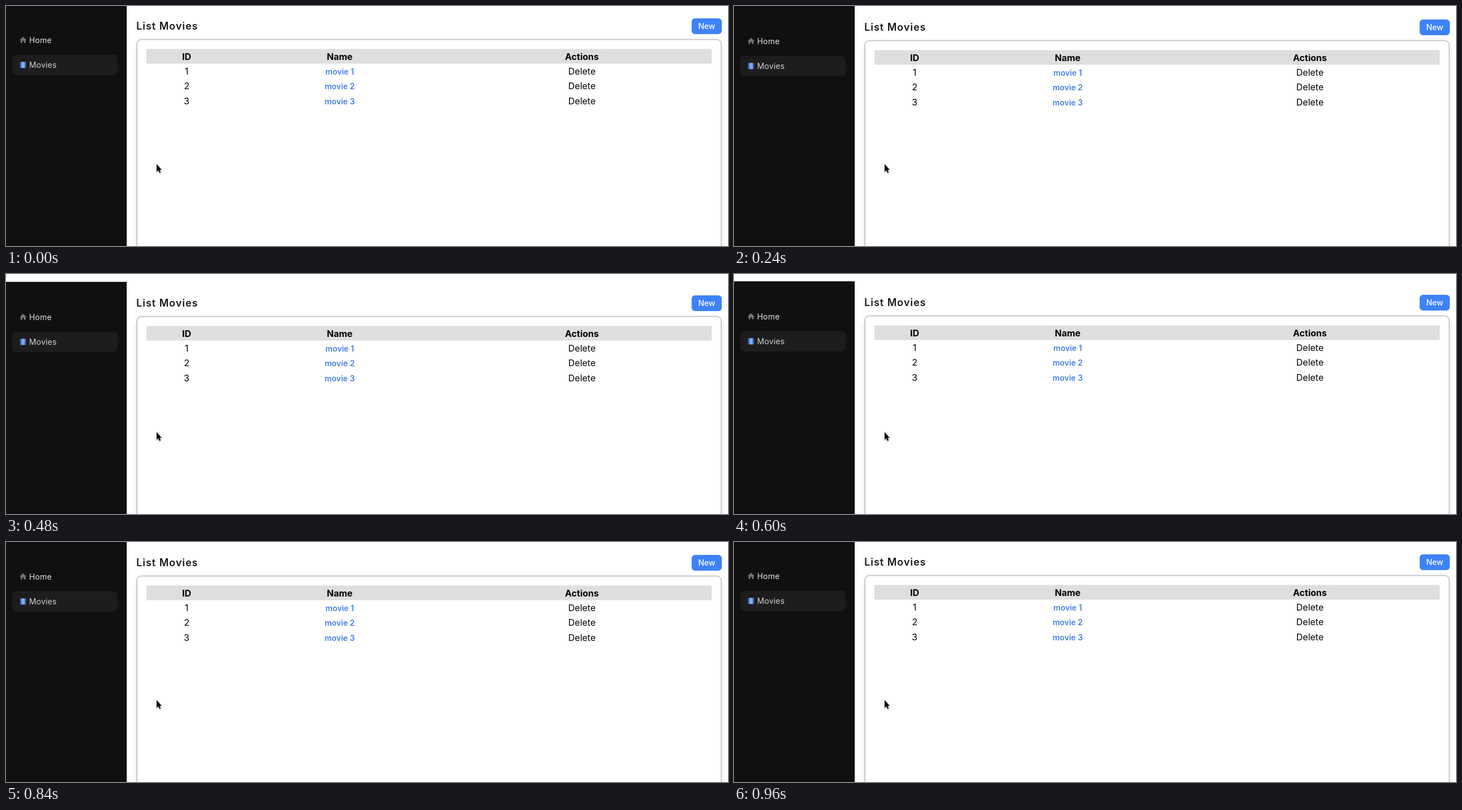
These frames come from a looping animation (1280 by 427 pixels, 1.08 s). An HTML page:

```html
<!DOCTYPE html>
<html lang="en">
<head>
<meta charset="utf-8">
<title>List Movies</title>
<style>
  html, body { margin: 0; width: 100%; height: 100%; overflow: hidden; background: #fff; }
  svg { display: block; width: 100%; height: 100%; }
  text { font-family: Inter, sans-serif; white-space: pre; }
</style>
</head>
<body>
<svg viewBox="0 0 1280 427">
  <defs>
    <filter id="soft" x="-10%" y="-10%" width="120%" height="120%">
      <feGaussianBlur stdDeviation="6"/>
    </filter>
    <filter id="drop" x="-50%" y="-50%" width="200%" height="200%">
      <feDropShadow dx="0" dy="1" stdDeviation="0.9" flood-opacity="0.4"/>
    </filter>
  </defs>
  <rect width="1280" height="427" fill="#fff"/>
  <g id="page">
    <rect x="232" y="69" width="1036" height="500" rx="8" fill="#000" opacity="0.13" filter="url(#soft)"/>
    <rect y="-2" width="214" height="480" fill="#101010"/>
    <rect x="11" y="86.5" width="187" height="36.5" rx="8" fill="#1d1d1d"/>
    <path d="M30.3 54.8L36.4 60.6H34.8V65.6H31.7V62.1H28.9V65.6H25.8V60.6H24.2Z" fill="#747474"/>
    <rect x="25" y="99.4" width="10.4" height="10.8" rx="0.6" fill="#4a80d2"/>
    <rect x="27.6" y="99.4" width="5.2" height="10.8" fill="#7eaaf5"/>
    <path d="M26.2 100.4V110M34.2 100.4V110" stroke="#172a48" stroke-width="1" stroke-dasharray="1 1.3"/>
    <rect x="232" y="59.5" width="1036" height="500" rx="8" fill="#fff" stroke="#c9c9c9" stroke-width="2"/>
    <rect x="249" y="76.5" width="1002" height="26" fill="#dedede"/>
    <rect x="1215.5" y="22" width="53.5" height="28" rx="6" fill="#3e82f7"/>
    <g id="labels"></g>
  </g>
  <path d="M267 281.3V295L270 292.2L272.2 297L274.3 296.1L272.2 291.5H276Z"
        fill="#000" stroke="#fff" stroke-width="1" paint-order="stroke" filter="url(#drop)"/>
</svg>
<script>
const STEP = 120;
const offsets = [0, 1, 2, 6, 16, 15, 3, 1, 0]; // overscroll bounce, px
const page = document.getElementById("page");
const labels = document.getElementById("labels");

function label(text, x, y, size, weight, fill, anchor = "middle", spacing = 0) {
  const el = document.createElementNS("http://www.w3.org/2000/svg", "text");
  const attrs = { x, y, fill, "font-size": size, "font-weight": weight,
    "text-anchor": anchor, "letter-spacing": spacing };
  for (const key in attrs) el.setAttribute(key, attrs[key]);
  el.textContent = text;
  labels.append(el);
}

label("Home", 41, 65.6, 14, 400, "#e2e2e2", "start", 0.2);
label("Movies", 41, 109.8, 14, 400, "#d2d2d2", "start", 0.2);
label("List Movies", 231, 42.2, 18, 600, "#181818", "start", 1);
label("New", 1242.3, 41.3, 14, 500, "#fff");
label("ID", 320.3, 95.8, 16, 700, "#000");
label("Name", 591.5, 95.8, 16, 700, "#000");
label("Actions", 1021, 95.8, 16, 700, "#000");
for (let id = 1; id <= 3; id++) {
  const y = 96 + 26.2 * id;
  label(id, 320.3, y, 16, 400, "#000");
  label("movie " + id, 591.6, y, 14, 600, "#4381e8");
  label("Delete", 1021, y, 16, 400, "#000");
}

function draw(now) {
  const i = Math.floor(now / STEP) % offsets.length;
  page.setAttribute("transform", `translate(0 ${offsets[i]})`);
  requestAnimationFrame(draw);
}
draw(performance.now());
</script>
</body>
</html>
```
